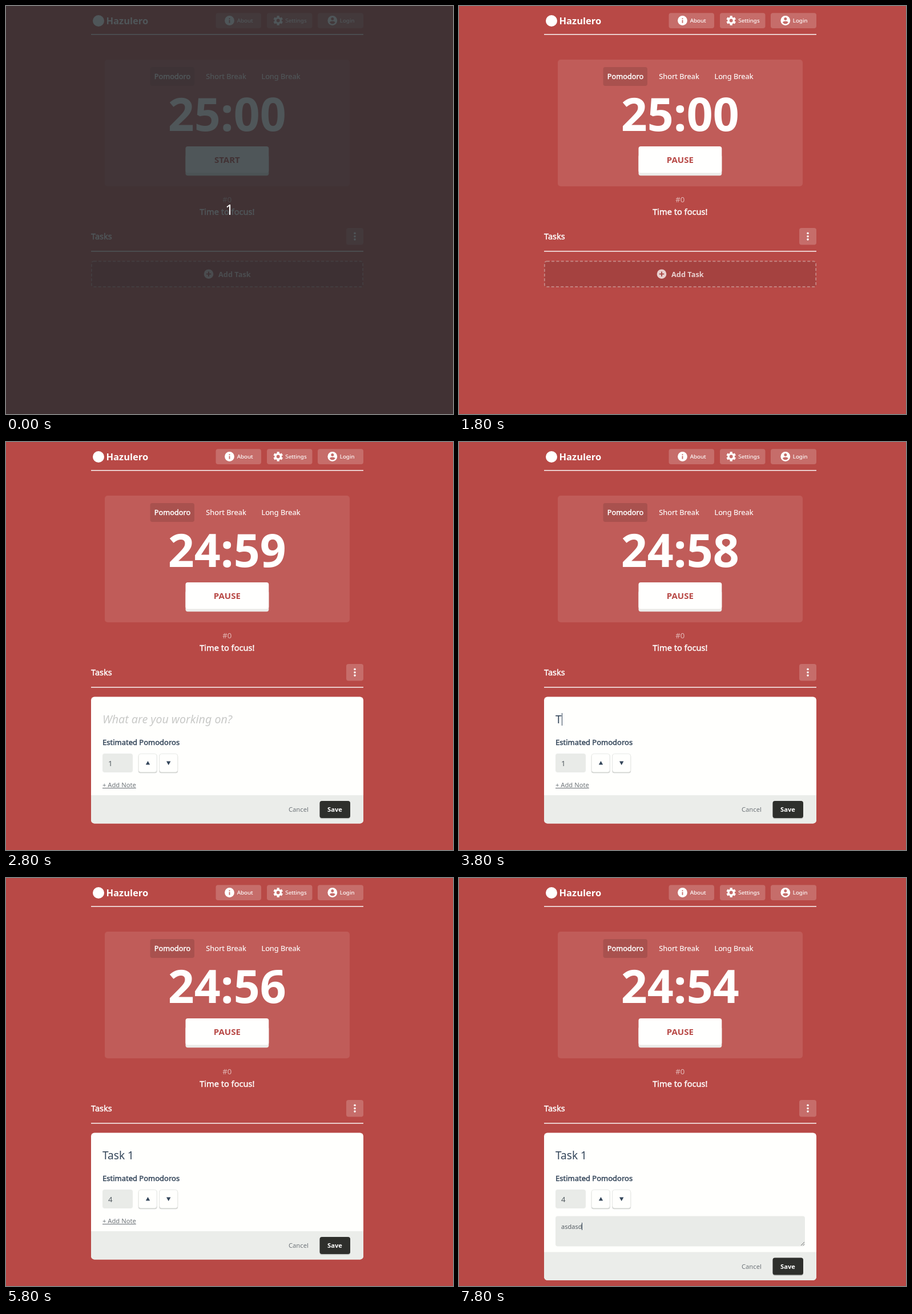
These frames come from a looping animation (783 by 715 pixels, 8 s). An HTML page:

```html
<!DOCTYPE html>
<html lang="en">
<head>
<meta charset="utf-8">
<title>Focus timer</title>
<style>
  html, body { margin: 0; width: 100%; height: 100%; overflow: hidden; background: #b84946; }
  svg { display: block; font-family: "Noto Sans", "Open Sans", sans-serif; }
  text { fill: #fffffe; white-space: pre; }
  .mid { text-anchor: middle; }
  .nav { font-size: 9.8px; stroke: #fffffe; stroke-width: .12; }
  .tab { font-size: 12.8px; stroke: #fffffe; stroke-width: .15; }
  .chip { fill: #c66d6a; }
  .white { fill: #fffffe; }
  .field { fill: #e9ebe8; }
  .ink { fill: #34465a; }
  .grey { fill: #70767b; }
  .small { font-size: 11.2px; }
  .bold { font-weight: 700; }
  /* a fine outline gives the weight between regular and bold */
  .medium { stroke: #fffffe; stroke-width: .45; }
  .medium.ink { stroke: #34465a; }
  .task { font-size: 19.1px; }
  .note { font-size: 11px; fill: #555d63; }
  .caret { fill: #34465a; }
</style>
</head>
<body>
<svg width="783" height="715" viewBox="0 0 783 715">
  <rect width="783" height="715" fill="#b84946"/>

  <!-- header -->
  <circle class="white" cx="162" cy="26" r="10"/>
  <text class="bold" x="175.5" y="31.5" font-size="16.5">Hazulero</text>
  <g class="chip">
    <rect x="367.5" y="12.3" width="79.5" height="26.7" rx="4"/>
    <rect x="457" y="12.3" width="79.5" height="26.7" rx="4"/>
    <rect x="546" y="12.3" width="80" height="26.7" rx="4"/>
  </g>
  <circle class="white" cx="391.5" cy="25.5" r="8.4"/>
  <path class="chip" d="M390.6 21.2h1.8v1.8h-1.8zM390.6 24.6h1.8v5.2h-1.8z"/>
  <g transform="translate(476.7 25.5)">
    <circle r="6.2" class="white"/>
    <path id="teeth" d="M0-8.3V8.3" stroke="#fffffe" stroke-width="4.2"/>
    <use href="#teeth" transform="rotate(60)"/>
    <use href="#teeth" transform="rotate(120)"/>
    <circle r="2.9" class="chip"/>
  </g>
  <circle class="white" cx="571.8" cy="25.5" r="8.4"/>
  <g class="chip">
    <circle cx="571.8" cy="22.4" r="2.5"/>
    <path d="M566.8 28.6q1.2-2.1 5-2.1t5 2.1q-1.8 2.9-5 2.9t-5-2.9z"/>
  </g>
  <g class="nav">
    <text x="404.7" y="29">About</text>
    <text x="489.3" y="29">Settings</text>
    <text x="584.8" y="29">Login</text>
  </g>
  <rect x="149" y="49" width="477" height="1.6" fill="#f6eae9"/>

  <!-- timer -->
  <rect x="173" y="94" width="429" height="222" rx="5" fill="#c05c59"/>
  <rect x="252.5" y="107" width="77.5" height="33" rx="4" fill="#a9514e"/>
  <g class="tab mid">
    <text class="medium" x="291.5" y="128">Pomodoro</text>
    <text x="385.5" y="128">Short Break</text>
    <text x="481.5" y="128">Long Break</text>
  </g>
  <text id="clock" class="bold mid" x="387.2" y="219" font-size="80.5">25:00</text>
  <rect x="314.5" y="260" width="145.8" height="37.3" rx="4" fill="#ebebe9"/>
  <rect x="314.5" y="246" width="145.8" height="46.5" rx="4" class="white"/>
  <text id="action" class="bold mid" x="387.3" y="275" font-size="15" style="fill:#b84946">START</text>
  <text class="mid" x="387.3" y="344" font-size="13.2" opacity=".6">#0</text>
  <text class="mid medium" x="387.3" y="366" font-size="14.6">Time to focus!</text>

  <!-- tasks -->
  <text class="medium" x="149" y="409" font-size="14.5">Tasks</text>
  <rect class="chip" x="596" y="389" width="30" height="29.5" rx="4"/>
  <g class="white">
    <circle cx="611" cy="398.3" r="1.8"/>
    <circle cx="611" cy="403.7" r="1.8"/>
    <circle cx="611" cy="409.1" r="1.8"/>
  </g>
  <rect x="149" y="429" width="477" height="1.6" fill="#f6eae9"/>

  <g id="add">
    <rect x="149.8" y="447.3" width="475.4" height="44.9" rx="4" fill="#a54240"
      stroke="#c68a87" stroke-width="1.7" stroke-dasharray="5 3.3"/>
    <circle cx="355" cy="469.7" r="8.3" fill="#e9d0cf"/>
    <path d="M350.8 469.7h8.4M355 465.5v8.4" stroke="#a54240" stroke-width="1.8"/>
    <text class="bold" x="372" y="474.5" font-size="12.8" style="fill:#e9d0cf">Add Task</text>
  </g>

  <g id="form">
    <rect id="sheet" x="149" y="446.5" width="477" height="222" rx="6" fill="#fffffd"/>
    <text id="hint" x="169" y="493" font-size="19.6" font-style="italic" style="fill:#c9cac8">What are you working on?</text>
    <text id="task" class="task ink" x="169" y="493" style="fill:#34465a"></text>
    <rect id="taskCaret" class="caret" y="475" width="1" height="22"/>
    <text class="medium ink" x="169" y="531" font-size="13">Estimated Pomodoros</text>
    <rect class="field" x="169" y="546" width="53" height="33" rx="4"/>
    <text id="count" x="179" y="567.5" font-size="13.2" style="fill:#555d63">1</text>
    <g id="step">
      <rect x="231.7" y="547" width="33" height="33.3" rx="4" fill="#cfd1ce"/>
      <rect x="232.2" y="546.4" width="32" height="32.2" rx="4" fill="#fffffd" stroke="#e8eae7"/>
    </g>
    <use href="#step" x="36.5"/>
    <path class="ink" d="M244.8 565.5h7.4l-3.7-6.6zM281 559.6h7.4l-3.7 6.6z"/>

    <text id="addNote" class="small grey" x="169" y="605" text-decoration="underline">+ Add Note</text>
    <g id="noteBox">
      <rect class="field" x="169" y="592.5" width="437" height="53" rx="4"/>
      <path d="M599 644l6-6M602.5 644l2.5-2.5" stroke="#666" stroke-width=".9"/>
      <text id="noteHint" class="note" x="179" y="614.5" style="fill:#a5a8a5">Some notes...</text>
      <text id="note" class="note" x="179" y="614.5"></text>
      <rect id="noteCaret" class="caret" y="604" width="1" height="13"/>
    </g>

    <g id="footer">
      <path d="M149 619h477v43.5a6 6 0 0 1-6 6h-465a6 6 0 0 1-6-6z" fill="#ebedea"/>
      <text class="small grey" x="495" y="648">Cancel</text>
      <rect x="549.5" y="630.5" width="53.5" height="30" rx="4" fill="#c4c6c3"/>
      <rect x="549.5" y="629" width="53.5" height="30" rx="4" fill="#2e2f2c"/>
      <text class="small bold mid" x="576" y="648">Save</text>
    </g>
  </g>

  <!-- countdown before the session -->
  <g id="cover">
    <rect width="783" height="715" fill="#242c30" opacity=".8"/>
    <text class="mid" x="391.3" y="366" font-size="25">1</text>
  </g>
</svg>
<script>
const LOOP = 8000;
const TICKS = [2800, 3800, 4700, 5700, 6800, 7800];
const CLICKS = [5400, 5600, 5800];
const TASK_KEYS = [3700, 4100, 4200, 4300, 4400, 4500];
const NOTE_KEYS = [7200, 7300, 7400, 7600, 7700, 7800];

const el = id => document.getElementById(id);
const show = (id, on) => { el(id).style.display = on ? "" : "none"; };
const passed = (times, t) => times.filter(x => x <= t).length;

// Types text at its key times and puts the caret behind it.
function type(id, hint, text, keys, t) {
  const node = el(id);
  node.textContent = text.slice(0, passed(keys, t));
  const end = +node.getAttribute("x") + node.getComputedTextLength();
  el(id + "Caret").setAttribute("x", Math.round(end));
  show(hint, t < keys[0]);
}

function draw(t) {
  const seconds = 1500 - passed(TICKS, t);
  const noteOpen = t >= 6200;
  el("clock").textContent =
    Math.floor(seconds / 60) + ":" + String(seconds % 60).padStart(2, "0");
  el("action").textContent = t < 1800 ? "START" : "PAUSE";
  el("count").textContent = 1 + passed(CLICKS, t);

  show("cover", t < 100);
  show("add", t < 2300);
  show("form", t >= 2300);
  show("addNote", !noteOpen);
  show("noteBox", noteOpen);
  el("sheet").setAttribute("height", noteOpen ? 258.5 : 222);
  el("footer").setAttribute("transform", `translate(0 ${noteOpen ? 36.5 : 0})`);

  type("task", "hint", "Task 1", TASK_KEYS, t);
  type("note", "noteHint", "asdasd", NOTE_KEYS, t);
  show("taskCaret", t >= 3500 && t < 5100);
  show("noteCaret", t >= 6500);
}

const start = performance.now();
function frame() {
  draw((performance.now() - start) % LOOP);
  requestAnimationFrame(frame);
}
frame();
</script>
</body>
</html>
```
